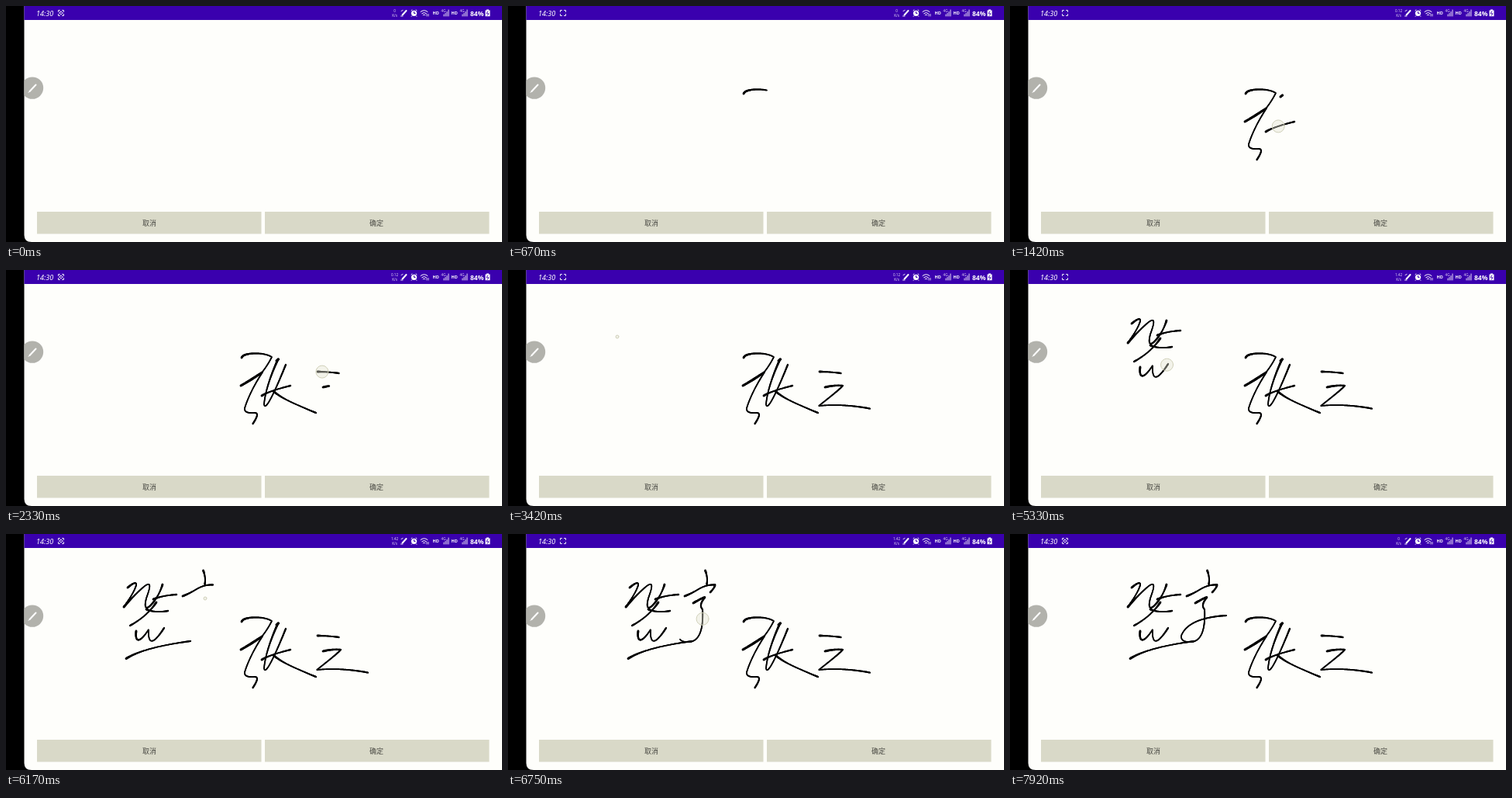
Write an HTML page with a canvas that moves like this. It is 640 px wide and 304 px high and loops after 8 s.

```html
<!DOCTYPE html>
<html lang="zh">
<head>
<meta charset="utf-8">
<title>Signature pad</title>
<style>
  html, body { margin: 0; width: 100%; height: 100%; overflow: hidden; background: #000; }
  svg, canvas { position: absolute; left: 0; top: 0; width: 640px; height: 304px; }
  text { font-family: "Noto Sans", "Noto Sans CJK SC", "Noto Sans CJK", sans-serif; fill: #fff; }
  .clock { font-size: 9px; font-style: italic; }
  .charge { font-size: 8.5px; font-weight: 600; }
  .mid { font-size: 5.5px; font-weight: 700; }
  .tiny { font-size: 4.5px; text-anchor: middle; opacity: .85; }
  .label { font-family: "Noto Sans CJK SC", "Noto Sans CJK", "Noto Sans", sans-serif;
    font-size: 9px; text-anchor: middle; fill: #4a4a44; }
  .line { fill: none; stroke: #fff; stroke-linecap: round; }
</style>
</head>
<body>
<svg viewBox="0 0 640 304">
  <defs>
    <clipPath id="screen"><path d="M640 0H23.5V295Q23.5 304 33 304H640Z"/></clipPath>
    <g id="signal">
      <text class="tiny" x="2.5" y="7.8">4G</text>
      <path class="line" opacity=".85" stroke-linecap="butt" d="M3 13V11M5 13V9.5M7 13V7.5M9 13V5"/>
    </g>
  </defs>
  <g clip-path="url(#screen)">
    <rect width="640" height="304" fill="#fefefb"/>
    <rect width="640" height="18" fill="#3a00ae"/>

    <text class="clock" x="39" y="12.5">14:30</text>
    <path class="line" stroke-width=".9" d="M67.5 7.5V5.5H69.5M72.5 5.5H74.5V7.5M74.5 10.5V12.5H72.5M69.5 12.5H67.5V10.5"/>
    <rect id="rec" class="line" stroke-width=".9" x="69.2" y="7.6" width="3.6" height="2.8" rx=".8"/>

    <text class="tiny" id="speed" x="501.5" y="8.3"></text>
    <text class="tiny" x="501.5" y="13.6">K/s</text>
    <path class="line" stroke-width="2" d="M511.5 11.5L516.5 6"/>
    <path class="line" stroke-width=".9" d="M509.5 13H512M510 6.5L512 5.5"/>
    <circle cx="526.5" cy="9.3" r="3.6" fill="#fff"/>
    <path class="line" d="M523 5.8L524 5M530 5.8L529 5M523.7 12.8L523.2 13.4M529.3 12.8L529.8 13.4"/>
    <path d="M526.5 7V9.5H528.4" fill="none" stroke="#3a00ae"/>
    <path class="line" d="M535 7.5Q539.5 3.7 544 7.5M536.7 9.6Q539.5 7.3 542.3 9.6M538.2 11.6Q539.5 10.6 540.8 11.6"/>
    <path class="line" stroke-width=".8" d="M543 10.5V13M545 10.5V13"/>
    <text class="mid" x="550.5" y="11">HD</text>
    <use href="#signal" x="562"/>
    <text class="mid" x="574.5" y="11">HD</text>
    <use href="#signal" x="586"/>
    <text class="charge" x="599" y="12.5">84%</text>
    <path d="M620 4.5H623V5.5H624.5V13.3H618.5V5.5H620Z" fill="#fff"/>
    <path d="M622 6.5L620 9.8H623L621 12.5" fill="none" stroke="#3a00ae" stroke-width=".9"/>

    <circle cx="34" cy="105.6" r="14.2" fill="#b2b2ac"/>
    <path class="line" stroke-width="2" d="M30.5 110L38.5 101.5"/>
    <path class="line" stroke-width=".9" d="M29 111.6L30.5 110"/>

    <rect x="40" y="265" width="289.5" height="28.5" fill="#d9d9c8"/>
    <rect x="334" y="265" width="289.5" height="28.5" fill="#d9d9c8"/>
    <text class="label" x="185" y="282.6">取消</text>
    <text class="label" x="478" y="282.6">确定</text>
  </g>
</svg>
<canvas id="ink" width="640" height="304"></canvas>
<script>
  const LOOP = 8000, LAG = 100, MAX_GAP = 300;
  const $ = id => document.getElementById(id);
  const ctx = $('ink').getContext('2d');
  ctx.lineCap = 'round';
  const strokes = [];

  // A stroke's duration follows from its length; hovering leaves no ink.
  function pen(from, d, hover = false) {
    const path = document.createElementNS('http://www.w3.org/2000/svg', 'path');
    path.setAttribute('d', d);
    const len = path.getTotalLength(), steps = Math.ceil(len);
    const pts = Array.from({ length: steps + 1 }, (_, i) => path.getPointAtLength(len * i / steps));
    strokes.push({ from, to: from + 60 + 1.6 * len, len, pts, hover });
  }

  // 张
  pen(600, 'M304 113Q306 108 320 107.5T343 112Q338 122 331 131L303 149');
  pen(840, 'M303 149Q322 139 331 131.5Q314 158 308 178Q307 185 321 184Q328 184 318.5 198');
  pen(1150, 'M349 117L351.5 115');
  pen(1265, 'M330 162Q339 156 367 149');
  pen(1470, 'M351 115Q335 150 333 173Q335 186 361 122');
  pen(1870, 'M345 156Q354 164 372 172T400 184');
  // 三
  pen(2210, 'M402 131Q415 131 429.5 133');
  pen(2315, 'M409 151Q422 148 432 149Q428 154 401 175Q432 172 467 178.5');
  // 签
  pen(3290, 'M140 86h1', true);
  pen(3650, 'M157 69Q169 59 168 66Q165 76 152 94');
  pen(3870, 'M152 94Q168 76 179 67C190 59 184 74 181 83C177 99 183 97 190 88');
  pen(4150, 'M202 65Q198 78 190 88');
  pen(4280, 'M190 84Q203 79 220 78');
  pen(4530, 'M194 88Q182 106 160 118');
  pen(4830, 'M181 97Q192 102 209 99');
  pen(5050, 'M168 125C166 142 174 139 184 123C183 143 190 143 204 121');
  pen(5400, 'M155 160.5Q178 146 238 138');
  // 字
  pen(5740, 'M254.5 47Q258 56 256.5 65');
  pen(5890, 'M228 80Q236 77 246 71T267 65.5');
  pen(6040, 'M256 83h1', true);
  pen(6190, 'M267 65.5Q267 69 261 75');
  pen(6560, 'M239 89Q258 78 253 83Q246 92 251 97Q253 136 235 139Q220 140 221 131Q230 108 279 105');

  const progress = (s, t) => Math.min(1, Math.max(0, (t - s.from) / (s.to - s.from)));
  const at = (s, u) => s.pts[Math.round(u * (s.pts.length - 1))];
  const mix = (a, b, u) => a + (b - a) * u;

  // The pen presses hardest on landing, a little on leaving, and more on short strokes.
  const pressure = (u, len) => 1.5 + 1.3 * (1 - u) ** 4 + 0.7 * u ** 4 + 6 / (len + 2);

  function drawStroke({ pts, len }, u) {
    const last = pts.length - 1;
    for (let i = 1; i <= Math.round(u * last); i++) {
      ctx.lineWidth = pressure(i / last, len);
      ctx.beginPath();
      ctx.moveTo(pts[i - 1].x, pts[i - 1].y);
      ctx.lineTo(pts[i].x, pts[i].y);
      ctx.stroke();
    }
  }

  // Touch marker: trails the pen and bridges short gaps between strokes.
  function marker(t) {
    const n = strokes.findIndex(s => t <= s.to);
    if (n < 0) return null;
    const cur = strokes[n], prev = strokes[n - 1];
    if (t >= cur.from) {
      const { x, y } = at(cur, progress(cur, t));
      return { x, y, r: cur.hover ? 2 : 8 };
    }
    if (!prev || cur.from - prev.to > MAX_GAP) return null;
    const u = (t - prev.to) / (cur.from - prev.to);
    const a = at(prev, 1), b = at(cur, 0);
    return { x: mix(a.x, b.x, u), y: mix(a.y, b.y, u), r: prev.hover || cur.hover ? 2 : 8 };
  }

  function draw(t) {
    ctx.clearRect(0, 0, 640, 304);
    ctx.strokeStyle = '#000';
    for (const s of strokes) {
      if (!s.hover) drawStroke(s, progress(s, t));
    }
    const m = marker(t - LAG);
    if (m) {
      ctx.beginPath();
      ctx.arc(m.x, m.y, m.r, 0, 2 * Math.PI);
      ctx.fillStyle = 'rgba(228,228,210,.4)';
      ctx.fill();
      ctx.lineWidth = 1;
      ctx.strokeStyle = '#cfcfb8';
      ctx.stroke();
    }
    $('rec').style.visibility = (t + 500) % 2000 < 1000 ? 'visible' : 'hidden';
    $('speed').textContent = t < 1000 || t >= 7000 ? '0' : t < 4000 ? '0.12' : '1.42';
  }

  function tick() {
    draw(performance.now() % LOOP);
    requestAnimationFrame(tick);
  }
  tick();
</script>
</body>
</html>
```
